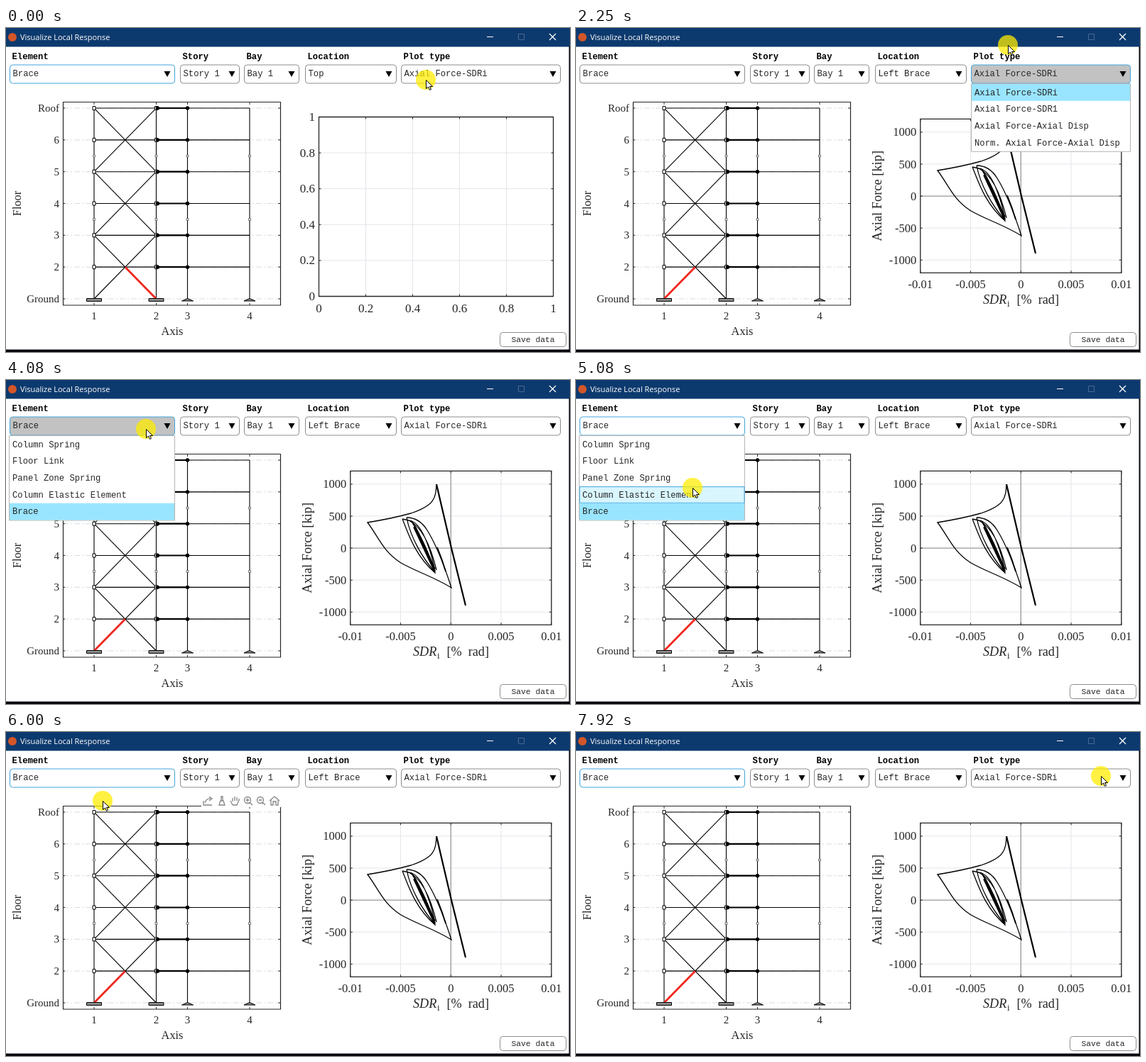
An HTML page with a canvas for the animation above (8 s loop, 794x457 px).

```html
<!DOCTYPE html>
<html lang="en">
<head>
<meta charset="utf-8">
<title>Visualize Local Response</title>
<style>
html, body { margin: 0; width: 100%; height: 100%; overflow: hidden; background: #fff; }
canvas { display: block; }
</style>
</head>
<body>
<canvas id="stage" width="794" height="457"></canvas>
<script>
const c = document.getElementById('stage').getContext('2d');
const LOOP = 8000, TICK = 1000 / 12;
const MONO = '"Liberation Mono", monospace', SERIF = '"Liberation Serif", serif';
const INK = '#262626';

// Ticks (1/12 s) at which the interface changes state
const LOADED = 15, REPLOT = 16, PLOT_OPEN = 19, PLOT_CLOSE = 33, ELEMENT_OPEN = 43, ELEMENT_CLOSE = 71;

// Pointer path: [tick, x, y]
const pointerPath = [
  [0, 591, 73], [3, 609, 56], [14, 609, 56], [15, 603, 65], [19, 605, 65], [24, 601, 32],
  [25, 601, 32], [27, 608, 24], [31, 608, 24], [37, 570, 60], [39, 570, 60], [44, 200, 66],
  [47, 200, 66], [49, 197, 69], [55, 197, 69], [58, 182, 127], [59, 182, 127], [61, 164, 152],
  [67, 132, 185], [69, 132, 185], [72, 136, 97], [75, 320, 180], [79, 600, 305],
  [80, 615, 270], [84, 673, 72], [94, 673, 72], [95, 739, 62]
];

const elementItems = ['Column Spring', 'Floor Link', 'Panel Zone Spring', 'Column Elastic Element', 'Brace'];
const plotItems = ['Axial Force-SDRi', 'Axial Force-SDR1', 'Axial Force-Axial Disp', 'Norm. Axial Force-Axial Disp'];

function text(s, x, y, font, color = INK, align = 'left') {
  c.font = font;
  c.fillStyle = color;
  c.textAlign = align;
  c.fillText(s, x, y);
}

function verticalText(s, x, y, font) {
  c.save();
  c.translate(x, y);
  c.rotate(-Math.PI / 2);
  text(s, 0, 0, font, INK, 'center');
  c.restore();
}

function line(x1, y1, x2, y2, color = '#000', width = 1) {
  c.strokeStyle = color;
  c.lineWidth = width;
  c.beginPath();
  c.moveTo(x1, y1);
  c.lineTo(x2, y2);
  c.stroke();
}

function box(x, y, w, h, fill, stroke, radius = 0, width = 1) {
  c.beginPath();
  c.roundRect(x, y, w, h, radius);
  if (fill) { c.fillStyle = fill; c.fill(); }
  if (stroke) { c.strokeStyle = stroke; c.lineWidth = width; c.stroke(); }
}

function polygon(points, fill, stroke) {
  c.beginPath();
  points.forEach(([x, y]) => c.lineTo(x, y));
  c.closePath();
  c.fillStyle = fill;
  c.fill();
  if (stroke) { c.strokeStyle = stroke; c.lineWidth = 1; c.stroke(); }
}

function disc(x, y, r, fill) {
  c.fillStyle = fill;
  c.beginPath();
  c.arc(x, y, r, 0, 7);
  c.fill();
}

function curve(d, width = 1.3) {
  c.strokeStyle = '#000';
  c.lineWidth = width;
  c.stroke(new Path2D(d));
}

function windowFrame() {
  box(0, 0, 794, 457, '#fff');
  box(0, 0, 794, 26.5, '#0d3a6e');
  box(0, 453.5, 794, 4, '#05080c');
  box(792.5, 26, 2, 431, '#05080c');
  disc(9, 13, 6, '#d4562a');
  text('Visualize Local Response', 20, 17, '11px "Open Sans", sans-serif', '#fff');
  line(677, 12.5, 686, 12.5, '#fff');
  box(721.5, 8.5, 8, 8, null, '#48698f');
  line(765, 8, 774, 17, '#fff', 1.2);
  line(774, 8, 765, 17, '#fff', 1.2);
  box(695.5, 429.5, 93, 20, '#fff', '#8c8c8c', 4);
  text('Save data', 742, 443, `11.3px ${MONO}`, INK, 'center');
}

function dropdown(label, value, x, right, focused, pressed) {
  text(label, x + 3.5, 44, `bold 12.2px ${MONO}`, '#000');
  box(x + .5, 52, right - x - 1, 26, pressed ? '#c2c2c2' : '#fff', focused ? '#42a5dc' : '#8c8c8c', 4);
  text(value, x + 4.5, 68, `12.2px ${MONO}`);
  polygon([[right - 15.5, 61], [right - 6.5, 61], [right - 11, 69]], '#000');
}

function popup(items, x, right, selected, hovered) {
  const row = 23.7;
  box(x + .5, 78.5, right - x - 1, items.length * row + 1, '#fff', '#b4b4b4');
  items.forEach((item, i) => {
    const y = 79 + i * row;
    if (i === selected) box(x + 1, y, right - x - 2, row, '#99e5ff');
    else if (i === hovered) box(x + 1, y + .5, right - x - 2, row - 1, '#d9f5fe', '#42a5dc');
    text(item, x + 5, y + 15.5, `12.2px ${MONO}`);
  });
}

// Structural frame on the left
const floorY = i => 382 - i * 44.83;
const axisX = [124, 211.5, 255.5, 343];

function structure(leftBrace) {
  const floors = ['Ground', '2', '3', '4', '5', '6', 'Roof'];
  floors.forEach((name, i) => {
    const y = floorY(i);
    c.setLineDash([8, 3, 2, 3]);
    line(80, y, 386, y, '#d9dce0');
    c.setLineDash([]);
    line(80, y, 83, y, INK);
    line(383, y, 386, y, INK);
    text(name, 75, y + 5, `15px ${SERIF}`, INK, 'right');
  });
  box(80.5, 104.5, 306, 286.5, null, INK, 0, 1.2);
  axisX.forEach((x, i) => {
    line(x, 388, x, 391, INK);
    line(x, 105, x, 108, INK);
    text(i + 1, x, 411, `15px ${SERIF}`, INK, 'center');
    line(x, floorY(6), x, floorY(0), '#000', 1.1);
    for (const y of [180.5, 270]) box(x - 1.5, y - 1.5, 3, 3, '#ddd', '#666', 0, .8);
  });
  const [a, b, d, e] = axisX;
  for (let i = 0; i < 6; i += 2) {
    line(a, floorY(i), b, floorY(i + 2), '#000', 1.1);
    line(b, floorY(i), a, floorY(i + 2), '#000', 1.1);
  }
  for (let i = 1; i < 7; i++) {
    const y = floorY(i);
    line(a, y, e, y, '#000', 1.1);
    line(b, y, d, y, '#000', 2.2);
    for (const x of [a, b]) box(x - 2, y - 2.5, 4, 5, '#fff', '#000');
    disc(b + 2, y, 2.7, '#000');
    disc(d, y, 2.7, '#000');
  }
  const mid = (a + b) / 2;
  line(leftBrace ? a : b, floorY(0), mid, floorY(1), '#f0281e', 2.8);
  for (const x of [a, b]) box(x - 10.5, 381.5, 21, 4, '#8c8c8c', '#000');
  for (const x of [d, e]) polygon([[x - 8, 385], [x, 381.5], [x + 8, 385]], '#8c8c8c', '#000');
  text('Axis', 234, 433, `16.3px ${SERIF}`, INK, 'center');
  verticalText('Floor', 21, 247.5, `16.3px ${SERIF}`);
}

// Axes on the right; ticks run from x / y0 by a constant step
function axes({ x, y, w, h, y0, dx, dy, xLabels, yLabels, size, zero }) {
  const font = `${size}px ${SERIF}`, bottom = y + h, right = x + w;
  xLabels.forEach((label, i) => {
    const tx = x + i * dx;
    line(tx, y, tx, bottom, '#e3e5ea');
    text(label, tx, bottom + 22, font, INK, 'center');
  });
  yLabels.forEach((label, i) => {
    const ty = y0 - i * dy;
    line(x, ty, right, ty, '#e3e5ea');
    text(label, x - 5.5, ty + 5.5, font, INK, 'right');
  });
  if (zero) {
    line(x, y0 - 2 * dy, right, y0 - 2 * dy, '#a0a0a0', 1.4);
    line(x + 2 * dx, y, x + 2 * dx, bottom, '#a0a0a0', 1.4);
  }
  box(x, y, w, h, null, INK, 0, 1.3);
  xLabels.forEach((_, i) => {
    line(x + i * dx, bottom - 3, x + i * dx, bottom, INK);
    line(x + i * dx, y, x + i * dx, y + 3, INK);
  });
  yLabels.forEach((_, i) => {
    line(x, y0 - i * dy, x + 3, y0 - i * dy, INK);
    line(right - 3, y0 - i * dy, right, y0 - i * dy, INK);
  });
}

const unit = ['0', '0.2', '0.4', '0.6', '0.8', '1'];
const emptyAxes = { x: 440.5, y: 125.5, w: 330, h: 253, y0: 378.5, dx: 66, dy: 50.6, xLabels: unit, yLabels: unit, size: 17 };
const forceLabels = {
  xLabels: ['-0.01', '-0.005', '0', '0.005', '0.01'],
  yLabels: ['-1000', '-500', '0', '500', '1000'], size: 16.5, zero: true
};
const firstAxes = { x: 485.5, y: 127.5, w: 280.5, h: 216.5, y0: 320.5, dx: 70.1, dy: 42.2, ...forceLabels };
const secondAxes = { x: 484.8, y: 128.3, w: 283, h: 217, y0: 327.3, dx: 70.75, dy: 45.1, ...forceLabels };

function forceAxes(a) {
  axes(a);
  const y = a.y + a.h + 43.5;
  text('SDR', 573, y, `italic 18.2px ${SERIF}`);
  text('i', 607, y + 4, `13px ${SERIF}`);
  text('[%\u00a0 rad]', 680, y, `18.2px ${SERIF}`, INK, 'right');
  verticalText('Axial Force [kip]', 430, a.y + a.h / 2, `18.4px ${SERIF}`);
}

function firstPlot() {
  forceAxes(firstAxes);
  curve('M647 151 L627 236 L606 311', 2.2);
  curve('M606 311C601 321 594 324 582 324L509 325Q509 320 512 309C520 284 531 252 537 235C548 200 565 163 583 161C588 163 588 172 603 179L627 189C620 222 603 264 574 282Q566 286 564 293');
  curve('M558 294C567 274 568 237 604 188Q600 220 571 280M558 294L570 276M564 293C569 262 585 220 605 193Q603 222 574 276');
  curve('M603 190Q582 228 571 279', 2.4);
  curve('M602 194L573 275', 3.4);
  curve('M619 204Q612 221 607 236', 1.8);
}

function secondPlot() {
  forceAxes(secondAxes);
  curve('M606 147L627 237L647 318', 2.2);
  curve('M606 147C605 167 603 177 570 188Q545 195 509 201C525 222 530 241 556 258C577 270 603 278 627 293C619 268 608 236 593 212Q582 194 564 194');
  curve('M558 196C566 215 575 247 604 272C601 250 588 205 571 199L558 196M564 194C569 220 585 250 604 271M567 198Q592 210 606 268');
  curve('M571 199Q588 226 604 270', 2);
  curve('M575 207L603 267', 4);
  curve('M607 236Q614 253 619 270', 1.8);
}

function toolbar(x, y) {
  box(x, y, 112, 18, '#fff');
  c.save();
  c.translate(x, y);
  c.strokeStyle = '#858585';
  c.lineWidth = 1.3;
  c.stroke(new Path2D('M3 9V15H15M5 12Q7 5 13 6M11 3L15 6L11 9M25 15L27 9H31L33 15ZM28 9V3H30V9M44 15L41 9M44 15H50L53 8M44 10V5M47 9V3M50 9V4M53 9V6'));
  for (const gx of [65, 83]) {
    c.stroke(new Path2D(`M${gx + 4.5} 8A4.5 4.5 0 1 1 ${gx - 4.5} 8A4.5 4.5 0 1 1 ${gx + 4.5} 8M${gx + 3} 11L${gx + 7} 15M${gx - 2.5} 8H${gx + 2.5}`));
  }
  c.stroke(new Path2D('M65 5.5V10.5M96 9L103 3L110 9M98 8V15H101V10H105V15H108V8'));
  c.restore();
}

function pointerAt(tick) {
  const i = pointerPath.findIndex(k => k[0] >= tick);
  const [t1, x1, y1] = pointerPath[i], [t0, x0, y0] = pointerPath[Math.max(0, i - 1)];
  const p = t1 > t0 ? (tick - t0) / (t1 - t0) : 1;
  return [x0 + (x1 - x0) * p, y0 + (y1 - y0) * p];
}

function pointer(x, y) {
  disc(x, y, 14, 'rgba(255,236,0,.74)');
  const outline = [[0, 0], [0, 12], [3, 9.5], [5, 14], [7, 13], [5, 9], [9, 9]];
  polygon(outline.map(([px, py]) => [x + .5 + px, y + .5 + py]), '#fff', '#000');
}

function draw(tick) {
  const [px, py] = pointerAt(tick);
  const loaded = tick >= LOADED;
  const plotOpen = tick >= PLOT_OPEN && tick < PLOT_CLOSE;
  const elementOpen = tick >= ELEMENT_OPEN && tick < ELEMENT_CLOSE;
  const plotFocus = tick >= PLOT_OPEN && tick < ELEMENT_OPEN;

  windowFrame();
  structure(loaded);
  if (!loaded) axes(emptyAxes);
  else if (tick < REPLOT) firstPlot();
  else secondPlot();

  if (tick >= 72 && tick < 76) toolbar(275, 88);
  if (tick >= 77 && tick < 83) toolbar(657, 112);

  dropdown('Element', 'Brace', 5, 238, !plotFocus, elementOpen && py < 79);
  dropdown('Story', 'Story 1', 245, 329, false);
  dropdown('Bay', 'Bay 1', 335, 413, false);
  dropdown('Location', loaded ? 'Left Brace' : 'Top', 421, 550, false);
  dropdown('Plot type', plotItems[0], 556, 781, plotFocus, plotOpen);
  if (plotOpen) popup(plotItems, 556, 781, 0, -1);
  if (elementOpen) popup(elementItems, 4, 238, 4, Math.floor((py - 79) / 23.7));
  pointer(px, py);
}

function frame() {
  // The small offset absorbs rounding at tick boundaries
  const t = performance.now() % LOOP;
  draw(Math.min(95, Math.floor((t + 4) / TICK)));
  requestAnimationFrame(frame);
}
frame();
</script>
</body>
</html>
```
